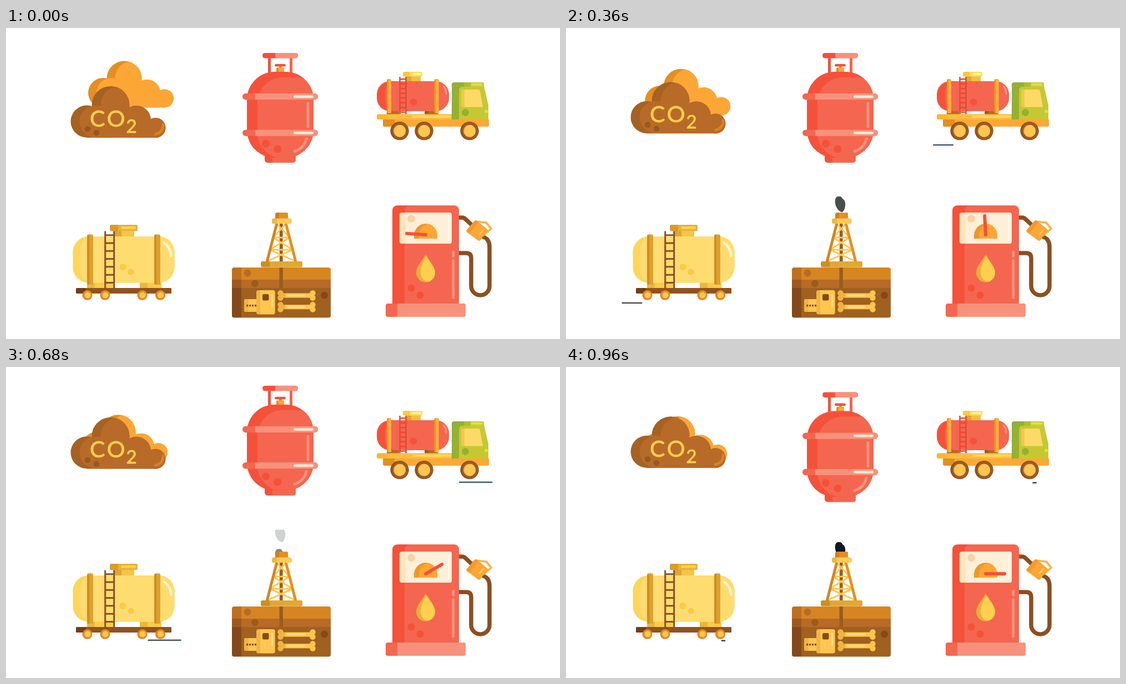
An HTML page for the animation above (1 s loop, 998 by 561 pixels).

```html
<!DOCTYPE html>
<html lang="en">
<head>
<meta charset="utf-8">
<title>Fuel icons</title>
<style>
html, body { margin: 0; width: 100%; height: 100%; overflow: hidden; background: #fff; }
svg { display: block; width: 100%; height: 100%; }
text { font-family: Lato, "Open Sans", sans-serif; fill: #fdd04d; stroke: #fdd04d; stroke-width: .9; }
</style>
</head>
<body>
<svg id="stage" viewBox="0 0 998 561"></svg>
<script>
const RED = '#f4513b', CORAL = '#f4664f', PINK = '#f8917c', CREAM = '#feebd5';
const AMBER = '#e38f22', ORANGE = '#fca636', YELLOW = '#fdc651', LEMON = '#fedc70';
const DARK = '#84491b', BROWN = '#a0601f', TAN = '#b86a28', HOSE = '#8b4f22';
const stage = document.getElementById('stage');

// Markup helpers
const rect = (x, y, w, h, r, fill) =>
  `<rect x="${x}" y="${y}" width="${w}" height="${h}" rx="${r}" fill="${fill}"/>`;
const disc = (x, y, r, fill) => `<circle cx="${x}" cy="${y}" r="${r}" fill="${fill}"/>`;
const path = (d, fill) => `<path d="${d}" fill="${fill}"/>`;
const line = (d, color, w, cap = 'round') =>
  `<path d="${d}" fill="none" stroke="${color}" stroke-width="${w}" stroke-linecap="${cap}" stroke-linejoin="round"/>`;
const group = (id, body) => `<g id="${id}">${body}</g>`;
let clips = 0;
const clipped = (shape, body) => {
  const id = 'clip' + clips++;
  return `<clipPath id="${id}">${shape}</clipPath><g clip-path="url(#${id})">${body}</g>`;
};
// A rounded bar whose right part, from x + cut, has a second colour
const bar = (x, y, w, h, r, a, b, cut) =>
  rect(x, y, w, h, r, a) + clipped(rect(x, y, w, h, r, a), rect(x + cut, y, w, h, 0, b));

function cloud(puffs, floor, dark, light, shift) {
  const shape = (fill, dx) => puffs.map(([x, y, r], i) => disc(x + (i < 2 ? dx : 0), y, r, fill)).join('') +
    rect(puffs[0][0] + dx, puffs[2][1], puffs[3][0] - puffs[0][0] - dx, floor - puffs[2][1], 0, fill);
  return shape(dark, 0) + clipped(shape(dark, 0), shape(light, shift));
}

function clouds() {
  const back = cloud([[175, 117, 27], [213, 91, 31.5], [254, 117, 24], [285.5, 127, 16.5]], 143.5, AMBER, ORANGE, 15);
  const front = cloud([[145.5, 168.5, 29], [188.5, 139, 34], [235, 166, 26], [269.5, 180, 18]], 197.8, '#a56222', TAN, 16);
  return group('back', back) + group('front', front +
    disc(147, 182, 5.3, '#985820') + disc(163, 189, 5.3, '#985820') +
    line('M283 174Q283 189 269 191.5', '#db8226', 4.5) +
    '<text x="151" y="177.500" font-size="41" letter-spacing="4">CO</text>' +
    '<text x="216.500" y="188.500" font-size="33">2</text>');
}

function cylinder() {
  const body = rect(434, 79, 120, 155, 50, RED);
  const band = y => bar(426, y, 136, 11.5, 5.7, CORAL, PINK, 23) + rect(518, y + 3.5, 36, 4.7, 2.3, CREAM);
  return group('cylinder',
    rect(472, 50, 5, 34, 0, RED) + rect(511, 50, 5, 34, 0, CORAL) +
    bar(462, 45, 64, 9.5, 4.5, RED, PINK, 23) +
    rect(492, 68, 5, 5, 0, AMBER) + rect(484, 65, 20, 4.6, 2.3, RED) +
    bar(487, 71.500, 14, 9, 2, AMBER, ORANGE, 4) +
    bar(466, 226, 56, 17, 5, RED, CORAL, 14) + body +
    clipped(body, rect(453, 89, 130, 146, 46, CORAL)) +
    line('M544 136V178', PINK, 5) + line('M541 200Q537 217 520 222.500', PINK, 5) +
    disc(468, 208.5, 7, RED) + disc(489.5, 218.5, 7, RED) + band(118) + band(183.4));
}

function ladder(x, w, top, bottom, gap, color, thick) {
  let d = `M${x} ${top}V${bottom}M${x + w} ${top}V${bottom}`;
  for (let y = top + gap / 2; y < bottom; y += gap) d += `M${x} ${y}h${w}`;
  return line(d, color, thick, 'butt');
}

function truck() {
  const tank = rect(668, 96, 130, 54, 24, RED);
  const cab = path('M803 102Q803 98 807 98H856Q859 98 860 101L869 140V165H803Z', '#94b035');
  const wheel = x => {
    const rim = disc(x, 185.7, 11, '#f0ae3f');
    return disc(x, 185.7, 16.6, HOSE) + clipped(disc(x, 185.7, 16.6), disc(x + 3, 185.7, 16.6, '#9b5a22')) +
      rim + clipped(rim, disc(x + 2, 185.7, 11, YELLOW));
  };
  const strap = x => bar(x, 92, 8, 62, 2.5, '#e39a28', '#fbb03b', 3);
  return bar(686, 148, 22, 8, 2, '#9b5a22', TAN, 7) + bar(754, 148, 25, 8, 2, '#9b5a22', TAN, 7) +
    bar(721, 85, 26, 14, 0, '#e3a52e', '#f6bd40', 9) + tank +
    clipped(tank, rect(683, 96, 130, 54, 20, CORAL)) +
    line('M788 105Q793 109 793 119', PINK, 3) + disc(734, 133.5, 6.3, RED) +
    bar(715, 79, 35, 8.5, 2.5, '#f4cb3c', '#fbdf5a', 12) + rect(732, 81.5, 16, 3.5, 1.7, '#fff4ad') +
    strap(686) + strap(771.5) + ladder(709.5, 11, 88, 157, 8.5, '#e94935', 2.6) +
    bar(679, 164, 191, 14, 3, AMBER, '#fba836', 21) +
    bar(668, 155.5, 137, 9.500, 2.5, '#fbb52f', '#fcbd3b', 20) + rect(731, 157.5, 71, 4.5, 2.2, '#ffd75a') +
    cab + clipped(cab, path('M816 165V112Q816 106 822 106H880V165Z', '#c5c931')) +
    bar(825, 98, 36, 8, 3, '#acbd32', '#cdce34', 12) + rect(838, 100.4, 20, 3, 1.5, '#e3df58') +
    path('M823 111H851Q853 111 853.500 113L859 142.500H820V114Q820 111 823 111Z', '#f3c84c') +
    path('M829 111H851Q853 111 853.500 113L859 142.500H826V114Q826 111 829 111Z', '#fdda68') +
    rect(862, 148, 7, 5, 2, '#e2dc4c') + disc(827.5, 152.5, 6.5, '#94b035') +
    [709, 753, 835].map(wheel).join('');
}

function railcar() {
  const tank = rect(120.5, 376, 183, 83.500, 28, '#fad75b');
  const strap = x => bar(x, 372.5, 11, 90.5, 2.5, '#d08c22', '#dfa02c', 4);
  const wheel = x => disc(x, 481.8, 9, '#c97a22') + disc(x + .6, 481.8, 8.2, AMBER) + disc(x + .5, 481.8, 5.500, YELLOW);
  return bar(194, 364, 37, 14, 0, '#dca730', '#f3c548', 14) +
    bar(146, 455, 50, 15, 0, '#e8b83a', '#f8cb4a', 14) + bar(241, 455, 39, 15, 0, '#e8b83a', '#f8cb4a', 14) + tank +
    clipped(tank, rect(133, 376, 190, 84, 24, LEMON)) +
    line('M284 387Q296 394 297.500 411', '#fff4cb', 4.6) +
    disc(210.5, 431, 6, '#f8cb48') + disc(225, 440, 5.5, '#f8cb48') +
    bar(187, 355, 50, 11, 2.5, '#d99a28', '#e8b236', 15) + rect(207, 358, 27, 4.5, 2.2, '#fdcf55') +
    strap(146) + strap(267) +
    bar(126, 469, 172, 10, 1.5, '#743d17', '#935220', 18) +
    ladder(178.7, 16, 366.5, 470, 14.3, HOSE, 3) + [146.5, 178.5, 245.5, 278].map(wheel).join('');
}

function ground() {
  const box = rect(407, 432, 178, 90.5, 4, DARK);
  const layer = (y, h, a, b) => rect(407, y, 17, h, 0, a) + rect(424, y, 161, h, 0, b);
  const bone = y => [494.5, 552.5].map((x, i) => disc(x, y - 4.2, 5.2, i ? YELLOW : '#eeb342') +
    disc(x, y + 4.2, 5.2, i ? YELLOW : '#eeb342')).join('') +
    bar(495, y - 4, 58, 8, 0, '#eeb342', YELLOW, 8) + rect(506, y - 2, 34, 3.6, 1.8, '#ffdb7a');
  let teeth = '';
  for (let x = 433; x < 451; x += 5) teeth += rect(x, 499, 3, 3.4, 0, DARK);
  return clipped(box, layer(432, 22, '#bd701d', '#d78520') + layer(454, 15, '#9b5a1f', TAN) + layer(469, 54, DARK, BROWN)) +
    disc(435, 442, 6.4, TAN) + disc(448.5, 461, 6.4, '#9b5a1f') + disc(573.5, 482, 6.4, DARK) +
    rect(492.5, 432, 6.3, 37, 0, '#9b5a1f') +
    bar(429, 489, 28, 23, 2, '#f0b644', YELLOW, 8) + teeth +
    bar(451, 473, 33.5, 43.5, 3.5, '#f0b644', YELLOW, 7) + rect(462, 480, 11.5, 11.5, 2.5, DARK) +
    rect(478, 479, 3.5, 25, 1.7, '#ffdb7a') + bone(482.5) + bone(503.3);
}

function rig() {
  const half = y => 8.5 + 17.5 * (y - 353) / 68;
  const levels = [353, 378, 400, 421];
  let braces = '';
  for (let i = 0; i < 3; i++) {
    const y = levels[i], z = levels[i + 1], a = half(y), b = half(z);
    braces += `M${496 - a} ${y}L${496 + b} ${z}M${496 + a} ${y}L${496 - b} ${z}`;
    if (i < 2) braces += `M${496 - b} ${z}H${496 + b}`;
  }
  return rect(492.8, 353, 5.8, 69, 0, '#9b5a1f') + line(braces, YELLOW, 3, 'butt') +
    line('M488 352L470 422', '#d48523', 5, 'butt') + line('M504 352L522 422', AMBER, 5, 'butt') +
    bar(459, 421, 75, 10.5, 3, '#cb8f27', '#dfa834', 16) +
    bar(485, 333, 23, 13, 3, '#d17f1e', AMBER, 7) +
    bar(479, 343.5, 35.5, 9.5, 3, '#f0b642', '#fdcb55', 9);
}

function pump() {
  const body = path('M696 497V330Q696 320 706 320H806Q816 320 816 330V497Z', RED);
  const dial = path('M735 380V374A21 21 0 0 1 777 374V380Z', '#ed972b');
  const drop = path('M756 409C763 421 773 431 773 441.500A17 17 0 0 1 739 441.500C739 431 749 421 756 409Z', '#e9b03c');
  return line('M814 342H822Q825 342 828 345L843 359', HOSE, 7.5) +
    line('M858 376Q871 380 871 394V465.500A16.500 16.500 0 0 1 838 465.500V415Q838 406 829 406H814', HOSE, 7.5) +
    line('M847 349L865 351L874 362L860 374', '#fcb045', 3.6) +
    path('M829.500 365L844 348Q846 346 848.500 348L867 363Q869 365 867 367L854 383Q852 385 850 383L830 368Q828.500 366.500 829.500 365Z', '#fba636') +
    path('M835 371L830 367Q829 366 830 364.500L844 348Q846 346 848.500 348L851 350Z', '#f2992c') +
    line('M853 372L860 364', '#fdc45f', 3) +
    body + clipped(body, path('M718 497V332Q718 320 730 320H816V497Z', CORAL)) +
    bar(684, 497, 144, 24, 4, CORAL, PINK, 21) +
    bar(709, 333, 94, 56, 4, '#fde5bd', '#feefd8', 11) + rect(796, 337, 3.5, 48, 1.7, '#fff8ea') +
    disc(730, 344, 7, '#fbd3a2') + dial + clipped(dial, path('M744 380V374A21 21 0 0 1 786 374V380Z', ORANGE)) +
    group('needle', line('M756 373H722', RED, 6)) +
    drop + clipped(drop, path('M764 409C771 421 781 431 781 441.500A17 17 0 0 1 747 441.500C747 431 753 421 758 409Z', '#fdcf4f')) +
    disc(730, 469, 6.6, RED) + disc(746, 482, 6.6, RED) +
    line('M805.800 419.500V486M805.800 404V411.500', PINK, 5);
}

const PUFF = 'M490 304C495 303 497 305 498 308C502 309 504 316 503 321C502 328 499 333 496 332C491 330 486 324 485 316C484 309 486 304.500 490 304Z';
stage.innerHTML = rect(0, 0, 998, 561, 0, '#fff') + clouds() + cylinder() + truck() + railcar() +
  clipped(rect(470, 293.5, 60, 60, 0, '#000'), group('puffA', path(PUFF, '#171f1b')) + group('puffB', path(PUFF, '#111722'))) +
  ground() + rig() + pump() + line('', '#000', 2).replace('<path', '<path id="road"') +
  line('', '#000', 2).replace('<path', '<path id="rail"');

const el = id => document.getElementById(id);
const move = (id, x, y) => el(id).setAttribute('transform', `translate(${x} ${y})`);

// Cubic Bezier easing, solved by bisection
function ease(p, x1, x2) {
  let lo = 0, hi = 1, s = .5;
  for (let i = 0; i < 24; i++) {
    s = (lo + hi) / 2;
    const x = 3 * (1 - s) * (1 - s) * s * x1 + 3 * (1 - s) * s * s * x2 + s * s * s;
    if (x < p) lo = s; else hi = s;
  }
  return s * s * (3 - 2 * s);
}

// Piecewise linear value through [time, value] keys
function track(t, keys) {
  if (t <= keys[0][0]) return keys[0][1];
  for (let i = 1; i < keys.length; i++) {
    const [a, u] = keys[i - 1], [b, v] = keys[i];
    if (t <= b) return u + (v - u) * (t - a) / (b - a);
  }
  return keys[keys.length - 1][1];
}

const needleKeys = [[0, 4], [80, 22], [160, 41], [260, 65], [360, 87], [440, 105], [520, 121], [600, 137], [680, 150], [800, 168], [880, 175.500], [960, 180]];
const hopKeys = [[560, 0], [600, -10], [640, -16], [680, -11.300], [720, -6.500], [760, -3], [800, -.8], [880, 0], [960, .4]];
const fadeA = [[0, 0], [160, .33], [360, .79], [400, .74], [520, .55], [680, .2], [780, 0]];
const fadeB = [[600, 0], [640, .4], [680, .53], [800, .68], [960, 1]];
const streaks = [
  { start: 0, from: 891.5, speed: .705, y: 211, road: '#2b3c78', rail: '#2d3a33' },
  { start: 585, from: 891, speed: .79, y: 207.7, road: '#17404f', rail: '#20323a' },
  { start: 950, from: 848, speed: .78, y: 208.7, road: '#151a28', rail: '#151f28' }
];

function drawStreak(t) {
  const s = streaks.filter(k => t > k.start).pop();
  let x1 = 0, x2 = 0;
  if (s) {
    const head = s.from - s.speed * (t - s.start);
    x1 = Math.max(661, head) + 1;
    x2 = Math.min(s.from, head + 60.5) - 1;
  }
  [['road', 0, 0], ['rail', -560.7, 285]].forEach(([id, dx, dy]) => {
    el(id).setAttribute('d', x2 > x1 ? `M${x1 + dx} ${s.y + dy}H${x2 + dx}` : '');
    if (s) el(id).setAttribute('stroke', s[id]);
  });
}

function draw(t) {
  const p = ease(t / 1000, .33, .32);
  move('back', -12 * p, 29.5 * p);
  move('front', 0, -15.7 * p);
  move('cylinder', 0, track(t, hopKeys));
  el('needle').setAttribute('transform', `rotate(${track(t, needleKeys)} 756 373)`);
  move('puffA', 0, 18 - .05 * t);
  el('puffA').setAttribute('opacity', track(t, fadeA));
  move('puffB', 0, 24.5 - .045 * (t - 680));
  el('puffB').setAttribute('opacity', track(t, fadeB));
  drawStreak(t);
}

function tick() {
  draw(Math.floor(performance.now() % 1000 / 40) * 40);
  requestAnimationFrame(tick);
}
tick();
</script>
</body>
</html>
```
